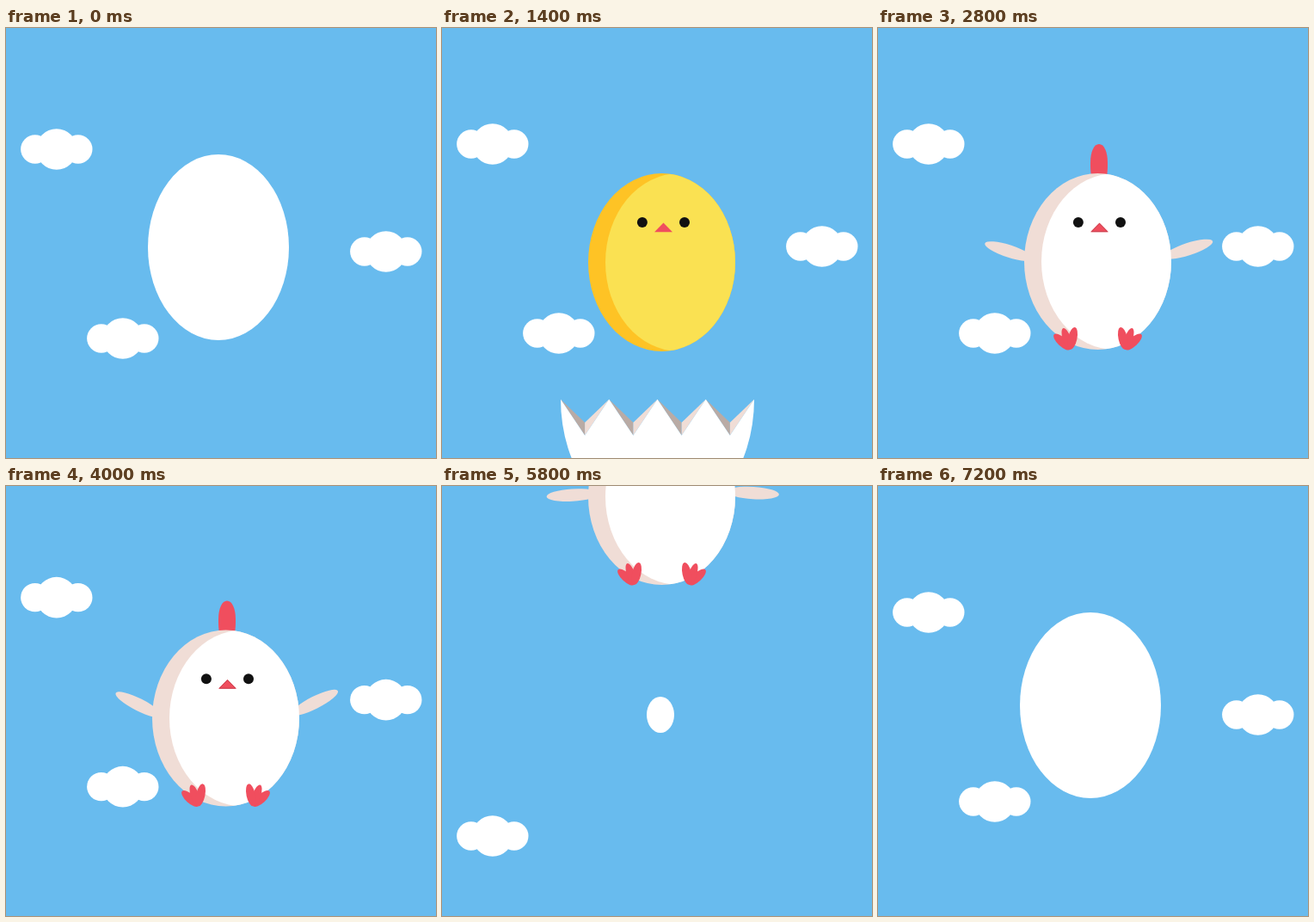
Write an HTML page that moves like this. It is 500 px wide and 500 px high and loops after 7300 ms.

```html
<!DOCTYPE html>
<html lang="en">
<head>
<meta charset="utf-8">
<title>Hatching chick</title>
<style>
html, body { margin: 0; width: 100%; height: 100%; overflow: hidden; background: #68bbee; }
svg { display: block; width: 100vw; height: 100vh; }
</style>
</head>
<body>
<svg viewBox="0 0 500 500">
  <defs>
    <g id="cloud" fill="#fff">
      <circle cx="-25" r="16.7"/><circle r="23.8"/><circle cx="25" r="16.7"/>
    </g>
    <g id="foot" fill="#f04e5e">
      <ellipse cy="-12.8" rx="5.2" ry="12.8" transform="rotate(-47)"/>
      <ellipse cy="-13" rx="4.7" ry="13" transform="rotate(-18)"/>
      <ellipse cy="-13.2" rx="5.2" ry="13.2" transform="rotate(12)"/>
    </g>
    <clipPath id="bodyClip"><ellipse id="clipShape" cx="255.5" rx="85.5"/></clipPath>
  </defs>
  <rect width="500" height="500" fill="#68bbee"/>
  <g id="clouds">
    <use href="#cloud" x="58.8" y="141"/>
    <use href="#cloud" x="441.8" y="260"/>
    <use href="#cloud" x="135.8" y="361"/>
  </g>
  <ellipse id="egg" fill="#fff"/>
  <g id="chick">
    <g id="wingL" fill="#f0ddd6"><ellipse cx="-27" rx="30" ry="7.2"/></g>
    <g id="wingR" fill="#f0ddd6"><ellipse cx="27" rx="30" ry="7.2"/></g>
    <path id="comb" fill="#f04e5e" d="M248 172C247 167 247 162 247 157C247 144 251 135 257 135S267 144 267 157C267 162 267 167 266 172Z"/>
    <ellipse id="shade" cx="255.5" rx="85.5"/>
    <g clip-path="url(#bodyClip)"><ellipse id="front" cx="275.5" rx="85.5"/></g>
    <g fill="#111"><circle cx="232.9" cy="225.9" r="6"/><circle cx="282" cy="225.9" r="6"/></g>
    <path fill="#f04e5e" d="M257.5 226.6L268 237.2H247Z"/>
    <path id="beakEdge" fill="none" stroke="#c8414f" d="M248.2 236.7L257.5 227.3L266.8 236.7Z"/>
    <use id="footL" href="#foot"/>
    <use id="footR" href="#foot"/>
  </g>
  <g id="shellLow"></g>
  <g id="shellTop"></g>
</svg>
<script>
const LOOP = 7300, STEP = 100;
const $ = id => document.getElementById(id);
const set = (id, attrs) => { for (const k in attrs) $(id).setAttribute(k, attrs[k]); };
const show = (id, on) => set(id, { visibility: on ? "visible" : "hidden" });
const move = (id, x, y, rest = "") => set(id, { transform: `translate(${x} ${y}) ${rest}` });
const lerp = (a, b, p) => a + (b - a) * p;
const ramp = (t, a, b) => Math.min(1, Math.max(0, (t - a) / (b - a)));
const ease = (t, a, b) => { const p = ramp(t, a, b); return p * p * (3 - 2 * p); };
const mix = (a, b, p) => `rgb(${a.map((v, i) => Math.round(lerp(v, b[i], p)))})`;

// Shell halves share one zigzag edge
const RX = 112.5, RY = 148, TOOTH = 56.25, DEPTH = 42, INNER = 27;
function buildShell() {
  const edge = [];
  let facets = "";
  for (let i = 0; i < 4; i++) {
    const x = -RX + i * TOOTH, mid = x + TOOTH / 2, end = x + TOOTH;
    edge.push([x, 0], [mid, DEPTH]);
    facets += `<path fill="#b9aba5" d="M${x} 0L${mid} ${INNER}V${DEPTH}Z"/>` +
              `<path fill="#f0ddd6" d="M${end} 0L${mid} ${INNER}V${DEPTH}Z"/>`;
  }
  edge.push([RX, 0]);
  const half = (pts, x) => `<path fill="#fff" d="M${pts.join("L")}A${RX} ${RY} 0 0 1 ${x} 0Z"/>`;
  $("shellLow").innerHTML = facets + half(edge, -RX);
  $("shellTop").innerHTML = half(edge.slice().reverse(), RX);
}

// Take-off: speeds up, then climbs steadily
function lift(t) {
  const start = 4352, cruise = 4800, speed = 0.21;
  if (t < start) return 0;
  if (t < cruise) return speed * (t - start) ** 2 / (2 * (cruise - start));
  return speed * ((cruise - start) / 2 + t - cruise);
}

const bob = t => 2 * Math.sin((t - 2800) / 1400 * 2 * Math.PI) * ramp(t, 300, 900) * (1 - ramp(t, 4200, 4500));

function cloudY(t) {
  const rise = -6 - 4 * ease(t, 3400, 4100) + 19 * ease(t, 4100, 4700) + bob(t) + lift(t);
  const late = t < 1000 ? t + LOOP : t;
  const settle = 1.03e-4 * Math.max(0, 7541 - late) ** 2 - 6;
  if (t < 1000) return settle + bob(t);
  if (t < 5000) return rise;
  const k = 8;
  return Math.min(rise, settle) - k * Math.log1p(Math.exp(-Math.abs(rise - settle) / k));
}

function drawEgg(t) {
  show("egg", t < 250 || t >= 4900);
  const grow = t < 1000 ? 1 : ease(t, 5800, 7150);
  const pop = t < 1000 ? ease(t, 0, 250) : 0;
  set("egg", {
    cx: lerp(lerp(254, 247, grow), 250.5, pop),
    cy: lerp(lerp(266, 255, grow), 272, pop),
    rx: lerp(lerp(16, 82, grow), RX, pop),
    ry: lerp(lerp(21, 108, grow), RY, pop)
  });
}

function drawChick(t) {
  show("chick", t >= 250 && t < 6500);
  const adult = ease(t, 1600, 2200), limbs = ease(t, 1800, 2400);
  const ry = lerp(103.5, 102.5, adult), cy = lerp(272.5, 271.5, adult);
  move("chick", 0, bob(t) - lift(t) - 2 * ramp(t, 4200, 4600));
  for (const id of ["shade", "front", "clipShape"]) set(id, { cy, ry });
  set("shade", { fill: mix([254, 195, 37], [240, 221, 214], adult) });
  set("front", { fill: mix([250, 225, 82], [255, 255, 255], adult) });
  set("beakEdge", { opacity: adult });

  const flap = 18 - 5.6 * bob(t);
  const angle = lerp(flap, -3.5, ease(t, 4200, 4750));
  move("wingL", 178.5, 268, `rotate(${angle}) scale(${limbs})`);
  move("wingR", 335, 265.5, `rotate(${-angle}) scale(${limbs})`);
  move("comb", 0, 38 * (1 - limbs));
  move("footL", 223.5, 373.8, `scale(${limbs})`);
  move("footR", 287.5, 373.8, `scale(${-limbs} ${limbs})`);
}

function drawShell(t) {
  const gone = Math.max(0, t - 250), on = t >= 250 && t < 2300;
  show("shellLow", on);
  show("shellTop", on);
  move("shellLow", 250.5, 272 + 0.139 * gone);
  move("shellTop", 250.5, 272 - 0.3 * gone);
}

function draw(t) {
  move("clouds", 0, cloudY(t));
  drawEgg(t);
  drawChick(t);
  drawShell(t);
}

function tick() {
  const t = performance.now() % LOOP;
  draw(Math.floor(t / STEP) * STEP);
  requestAnimationFrame(tick);
}

buildShell();
tick();
</script>
</body>
</html>
```
